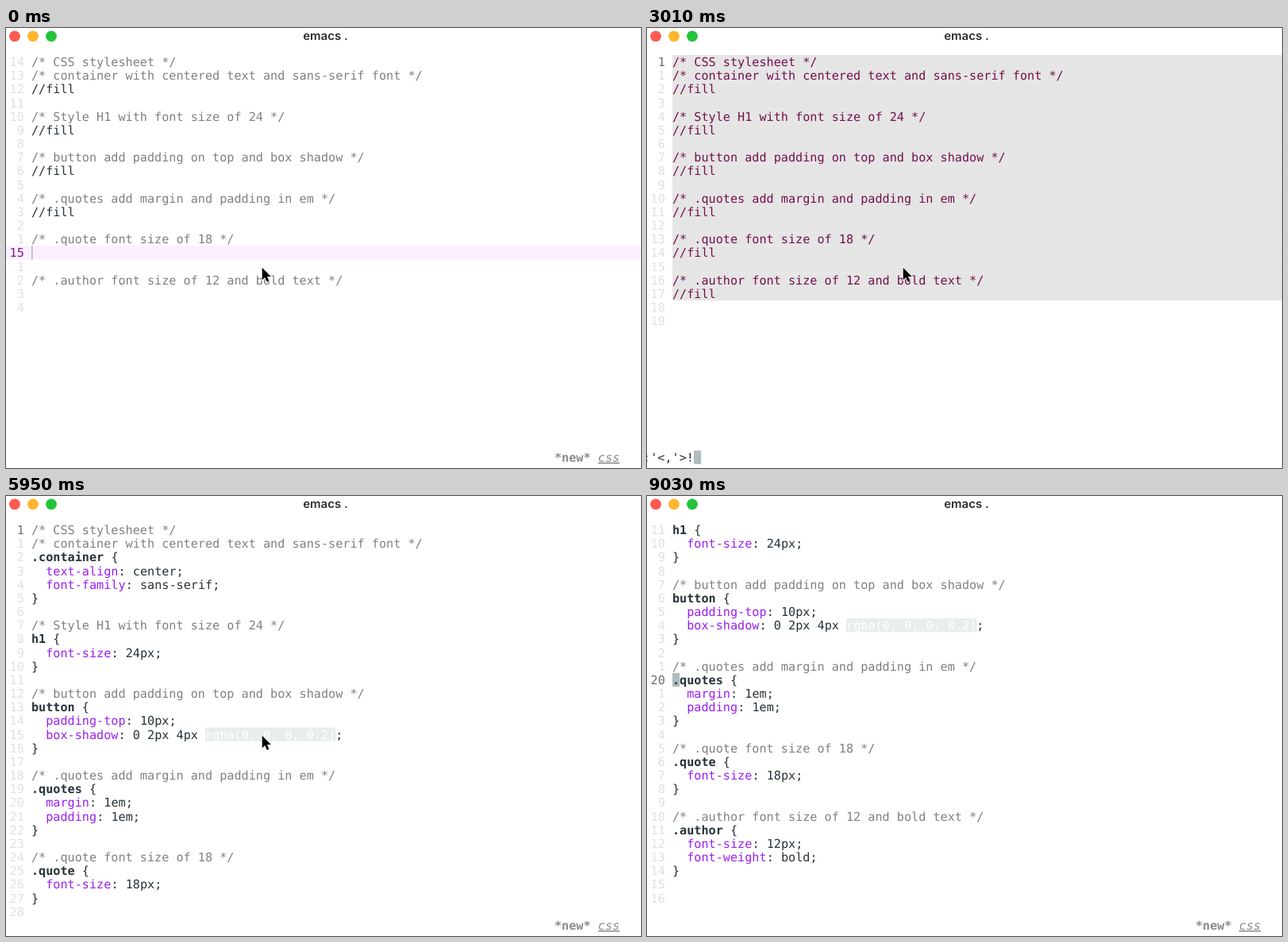
Recreate the animation shown at these times as an HTML page. Size 800 by 554 pixels, loop 9.1 s.

```html
<!DOCTYPE html>
<html lang="en">
<head>
<meta charset="utf-8">
<title>emacs</title>
<style>
  html, body { margin: 0; width: 100%; height: 100%; overflow: hidden; background: #fff; }
  svg { display: block; width: 100vw; height: 100vh; }
  text { white-space: pre; font: 15.16px "DejaVu Sans Mono", monospace; text-rendering: geometricPrecision; fill: #263238; }
  .title { font: 600 15px Inter, sans-serif; fill: #2d2d2d; }
  .num { text-anchor: end; fill: #e0e0e0; }
  .num.here { fill: #6e6e6e; }
  .num.insert { fill: #86168f; }
  .comment { fill: #808080; }
  .name { font-weight: bold; }
  .prop { fill: #9b1ff0; }
  .white { fill: #fff; }
  .picked { fill: #74104c; }
  .mode { fill: #8a8a8a; }
  .u { font-style: italic; text-decoration: underline; }
</style>
</head>
<body>
<svg viewBox="0 0 800 554" preserveAspectRatio="none">
  <rect width="800" height="554" fill="#fff"/>
  <g id="view"></g>
  <circle cx="11" cy="10.3" r="6.9" fill="#ff5b52"/>
  <circle cx="34" cy="10.3" r="6.9" fill="#ffb52e"/>
  <circle cx="57" cy="10.3" r="6.9" fill="#22c43c"/>
  <text class="title" x="402.5" y="15" text-anchor="middle">emacs .</text>
  <path id="pointer" d="M322.7 301.8v15.4l3.5-3.3 2.5 5.9 2.7-1.1-2.5-5.8h4.9z" fill="#000" stroke="#fff" stroke-width="1.4" paint-order="stroke"/>
</svg>
<script>
const LOOP = 9100, LEFT = 32, TOP = 34, ROW = 17.17, CHAR = 9.127, ROWS = 29;
const CURSOR = '#b0bcc0', FILL = '//fill';
const view = document.getElementById('view');
const pointer = document.getElementById('pointer');

const notes = [
  'container with centered text and sans-serif font',
  'Style H1 with font size of 24',
  'button add padding on top and box shadow',
  '.quotes add margin and padding in em',
  '.quote font size of 18',
  '.author font size of 12 and bold text'
].map(s => `/* ${s} */`);
const rules = [
  ['.container', 'text-align: center', 'font-family: sans-serif'],
  ['h1', 'font-size: 24px'],
  ['button', 'padding-top: 10px', 'box-shadow: 0 2px 4px rgba(0, 0, 0, 0.2)'],
  ['.quotes', 'margin: 1em', 'padding: 1em'],
  ['.quote', 'font-size: 18px'],
  ['.author', 'font-size: 12px', 'font-weight: bold']
];
const head = '/* CSS stylesheet */';
const styled = [head, ...rules.flatMap(([name, ...props], i) =>
  [notes[i], name + ' {', ...props.map(p => `  ${p};`), '}', '']), ''];

// Number of key presses made by time t
const keys = (t, start, gap, n) => Math.max(0, Math.min(n, Math.floor((t - start) / gap) + 1));

function draft(quote, author) {
  const lines = [head];
  notes.forEach((note, i) => {
    lines.push(note);
    const body = i < 4 ? FILL : i === 4 ? quote : author;
    if (body !== null) lines.push(body);
    lines.push('');
  });
  return [...lines, ''];
}

function command(t) {
  if (t < 2800 || t >= 5040) return null;
  return ":'<,'>" + (t >= 2940 ? '!' : '') +
    'fill-code'.slice(0, keys(t, 3080, 75, 9)) +
    ' --lang css'.slice(0, keys(t, 4130, 80, 11));
}

function stateAt(t) {
  const s = { mode: 'normal', top: 1, col: 0, echo: command(t), cursor: true };
  if (t < 1470) {
    const n = keys(t, 140, 140, 6);
    s.lines = draft(FILL.slice(0, n), null);
    s.line = t < 1150 ? 15 : t < 1260 ? 16 : 17;
    s.mode = t < 1050 ? 'insert' : 'normal';
    s.col = t < 1050 ? n : s.line === 16 ? 0 : 5;
  } else if (t < 5670) {
    const n = keys(t, 1675, 140, 6);
    s.lines = draft(FILL, FILL.slice(0, n));
    s.line = t < 2660 ? 18 : 1;
    s.mode = t < 2450 ? 'insert' : t < 2520 ? 'normal' : 'visual';
    s.col = t < 2450 ? n : 5;
    s.cursor = s.echo === null;
  } else {
    const down = 1 + keys(t, 6645, 9999, 1) + keys(t, 7050, 40, 3) + keys(t, 7212, 20, 31);
    s.lines = styled;
    s.line = down - keys(t, 7850, 20, 16);
    s.top = Math.max(1, down - 27);
    s.cursor = t >= 6645;
  }
  return s;
}

const esc = s => s.replace(/&/g, '&amp;').replace(/</g, '&lt;');
const text = (s, x, y, cls = '') => `<text class="${cls}" x="${x}" y="${y}">${esc(s)}</text>`;
const box = (x, y, w, fill, h = ROW) =>
  `<rect x="${x}" y="${y}" width="${w}" height="${h}" fill="${fill}"/>`;

// Splits a line into [text, class] pieces
function pieces(line, picked) {
  if (picked) return [[line, 'picked']];
  if (line.startsWith('/*')) return [[line, 'comment']];
  if (line.endsWith('{')) return [[line.slice(0, -2), 'name'], [' {', '']];
  const m = line.match(/^(  [\w-]+)(:.*?)(rgba\(.*\))?(;)$/);
  return m ? [[m[1], 'prop'], [m[2], ''], [m[3] || '', 'white'], [m[4], '']] : [[line, '']];
}

function drawLine(line, y, picked) {
  let out = '', at = 0;
  for (const [s, cls] of pieces(line, picked)) {
    const x = LEFT + at * CHAR;
    if (s && cls === 'white') out += box(x, y, s.length * CHAR, '#e9edee');
    if (s) out += text(s, x, y + 14, cls);
    at += s.length;
  }
  return out;
}

function draw(s) {
  let out = '';
  const last = Math.min(s.lines.length, s.top + ROWS - 1);
  for (let n = s.top; n <= last; n++) {
    const y = TOP + (n - s.top) * ROW, here = n === s.line;
    const picked = s.mode === 'visual' && n >= s.line && n <= 18;
    const line = s.lines[n - 1], x = LEFT + s.col * CHAR;
    if (picked) out += box(LEFT, y, 800 - LEFT, '#e5e5e5', ROW + 0.1);
    if (here && s.mode === 'insert') out += box(0, y, 800, '#fbf0fd');
    if (here && s.cursor) out += box(x, y, s.mode === 'insert' ? 1.6 : CHAR, CURSOR);
    const cls = here ? `num here ${s.mode}` : 'num';
    out += text(String(here ? n : Math.abs(n - s.line)), LEFT - CHAR, y + 14, cls);
    out += drawLine(line, y, picked);
    if (here && s.cursor && picked) out += text(line[s.col] || '', x, y + 14);
  }
  if (s.echo === null) {
    out += text('*new*', 691, 546, 'mode name') + text('css', 745.8, 546, 'mode u');
  } else {
    out += text(s.echo, -4.9, 546) + box(s.echo.length * CHAR - 4.9, 532, CHAR, CURSOR);
  }
  return out;
}

let shown = '';
function frame(now) {
  const t = now % LOOP, next = draw(stateAt(t));
  if (next !== shown) view.innerHTML = shown = next;
  pointer.style.display = t < 9025 ? '' : 'none';
  requestAnimationFrame(frame);
}
const start = performance.now();
frame(0);
function tick() { frame(performance.now() - start); }
</script>
</body>
</html>
```
